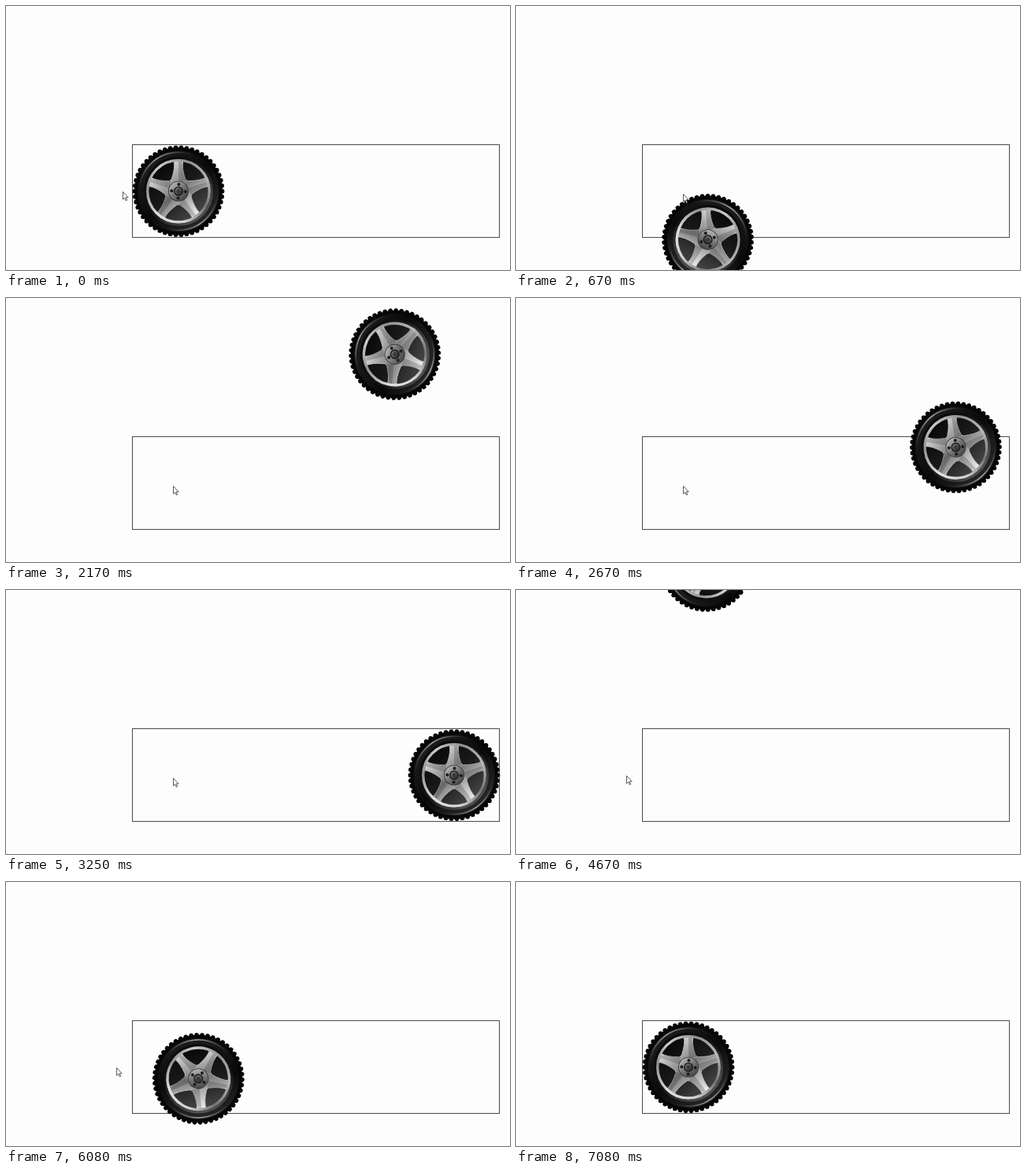
Animation, 640 px wide and 336 px high, one loop 7.16 s. Source, as an HTML page with a canvas:

```html
<!DOCTYPE html>
<html lang="en">
<head>
<meta charset="utf-8">
<title>Spiralling wheel</title>
<style>
  html, body { margin: 0; width: 100%; height: 100%; overflow: hidden; background: #fdfdfd; }
  canvas { display: block; width: 100vw; height: 100vh; }
</style>
</head>
<body>
<canvas id="stage" width="640" height="336"></canvas>
<script>
const ctx = document.getElementById('stage').getContext('2d');
const TAU = Math.PI * 2;
const LOOP = 7160, STEP = 1000 / 12;
const OUT = { start: 206, duration: 3030 };
const BACK = { start: 4150, duration: 2970 };
const HOME = { x: 219, y: 235.7 }, TRAVEL = 350;

// Pointer stops: time, x, y
const pointerStops = [
  [0, 148, 236], [83, 148, 236], [250, 212, 239],
  [4000, 212, 239], [4200, 140, 236],
  [6700, 140, 236], [6900, 72, 237], [6999, 72, 237]
];

// CSS "ease": cubic-bezier(.25, .1, .25, 1)
function ease(x) {
  if (x <= 0) return 0;
  if (x >= 1) return 1;
  let low = 0, high = 1, s;
  for (let i = 0; i < 24; i++) {
    s = (low + high) / 2;
    if (0.75 * s * (1 - s) + s ** 3 < x) low = s; else high = s;
  }
  return 0.3 * (1 - s) ** 2 * s + 3 * (1 - s) * s * s + s ** 3;
}

const eased = (time, { start, duration }) => ease((time - start) / duration);

function fade(gradient, ...colors) {
  colors.forEach((c, i) => gradient.addColorStop(i / (colors.length - 1), c));
  return gradient;
}

const linear = (r, ...colors) =>
  fade(ctx.createLinearGradient(-r * 0.65, -r * 0.75, r * 0.65, r * 0.75), ...colors);
const conic = (angle, ...colors) =>
  fade(ctx.createConicGradient(angle, 0, 0), ...colors);
const polar = (r, angle) => [r * Math.cos(angle), r * Math.sin(angle)];

function disc(r, fill, x = 0, y = 0) {
  ctx.beginPath();
  ctx.arc(x, y, r, 0, TAU);
  ctx.fillStyle = fill;
  ctx.fill();
}

function ring(r, width, stroke) {
  ctx.beginPath();
  ctx.arc(0, 0, r, 0, TAU);
  ctx.lineWidth = width;
  ctx.strokeStyle = stroke;
  ctx.stroke();
}

function drawTyre() {
  const knobs = 50;
  for (let i = 0; i < knobs; i++) disc(2.9, '#060606', ...polar(55.5, i * TAU / knobs));
  disc(55.8, '#060606');
  ring(47, 9, linear(50, '#1c1c1c', '#090909', '#262626'));
  const glow = '#a4a4a4', dim = '#484848', clear = 'rgba(16,16,16,0)';
  ring(49.5, 1.6, conic(-2.15, glow, dim, clear, clear, clear,
    dim, glow, dim, clear, clear, clear, dim, glow));
  ring(42.6, 3, linear(42, '#0a0a0a', '#151515', '#505050'));
}

function drawSpokes() {
  ctx.beginPath();
  for (let i = 0; i < 5; i++) {
    const a = -Math.PI / 2 + i * TAU / 5;
    ctx.lineTo(...polar(39, a - 0.15));
    ctx.lineTo(...polar(39, a + 0.15));
    ctx.quadraticCurveTo(...polar(30, a + 0.13), ...polar(17.5, a + TAU / 10 - 0.1));
    ctx.lineTo(...polar(17.5, a + TAU / 10 + 0.1));
    ctx.quadraticCurveTo(...polar(30, a + TAU / 5 - 0.13), ...polar(39, a + TAU / 5 - 0.15));
  }
  ctx.closePath();
  ctx.fillStyle = linear(36, '#dcdcdc', '#a8a8a8', '#7c7c7c', '#b4b4b4', '#e6e6e6');
  ctx.fill();
  ctx.lineWidth = 0.8;
  ctx.strokeStyle = '#c4c4c4';
  ctx.stroke();
  // Shaded flank gives each spoke a ridge
  for (let i = 0; i < 5; i++) {
    const a = -Math.PI / 2 + i * TAU / 5;
    ctx.beginPath();
    ctx.moveTo(...polar(12, a));
    ctx.lineTo(...polar(38, a));
    ctx.lineTo(...polar(38, a + 0.1));
    ctx.lineTo(...polar(17, a + TAU / 10));
    ctx.fillStyle = 'rgba(40,40,40,.24)';
    ctx.fill();
  }
}

function drawHub() {
  disc(13, '#303030');
  disc(12.2, linear(12, '#b2b2b2', '#747474', '#4a4a4a'));
  for (let i = 0; i < 4; i++)
    disc(2, '#1c1c1c', ...polar(8.7, i * TAU / 4 + 0.05));
  disc(6, '#1a1a1a');
  disc(4.6, linear(5, '#747474', '#2c2c2c'));
  disc(2.4, '#3a3a3a');
}

function drawWheel(progress) {
  ctx.save();
  ctx.translate(HOME.x, HOME.y);
  ctx.rotate(progress * TAU);
  ctx.translate(progress * TRAVEL, 0);
  drawTyre();
  disc(39, linear(38, '#0a0a0a', '#1a1a1a', '#444'));
  drawSpokes();
  ring(39.3, 3.4, conic(-2.2, '#cacaca', '#909090', '#b8b8b8', '#747474',
    '#d4d4d4', '#e0e0e0', '#909090', '#cacaca'));
  drawHub();
  ctx.restore();
}

function drawPointer(time) {
  const next = pointerStops.findIndex(stop => stop[0] > time);
  if (next < 1) return;
  const [t0, x0, y0] = pointerStops[next - 1], [t1, x1, y1] = pointerStops[next];
  const k = (time - t0) / (t1 - t0);
  ctx.save();
  ctx.translate(Math.round(x0 + (x1 - x0) * k), Math.round(y0 + (y1 - y0) * k));
  ctx.fillStyle = '#fdfdfd';
  ctx.strokeStyle = '#48484c';
  ctx.lineWidth = 0.9;
  const outline = new Path2D('M.5 .5V10.2L2.7 8.2 4.3 11.8 5.7 11.2 4.2 7.7H7.2Z');
  ctx.fill(outline);
  ctx.stroke(outline);
  ctx.restore();
}

function draw(now) {
  // The picture advances twelve times a second
  const time = Math.floor((now % LOOP + 4) / STEP) * STEP;
  const progress = eased(time, OUT) - eased(time, BACK);
  ctx.fillStyle = '#fdfdfd';
  ctx.fillRect(0, 0, 640, 336);
  ctx.lineWidth = 1;
  ctx.strokeStyle = '#4a4a4c';
  ctx.strokeRect(160.5, 176.5, 466, 118);
  drawWheel(progress);
  drawPointer(time);
}

const start = performance.now();
function tick() {
  draw(performance.now() - start);
  requestAnimationFrame(tick);
}
tick();
</script>
</body>
</html>
```
